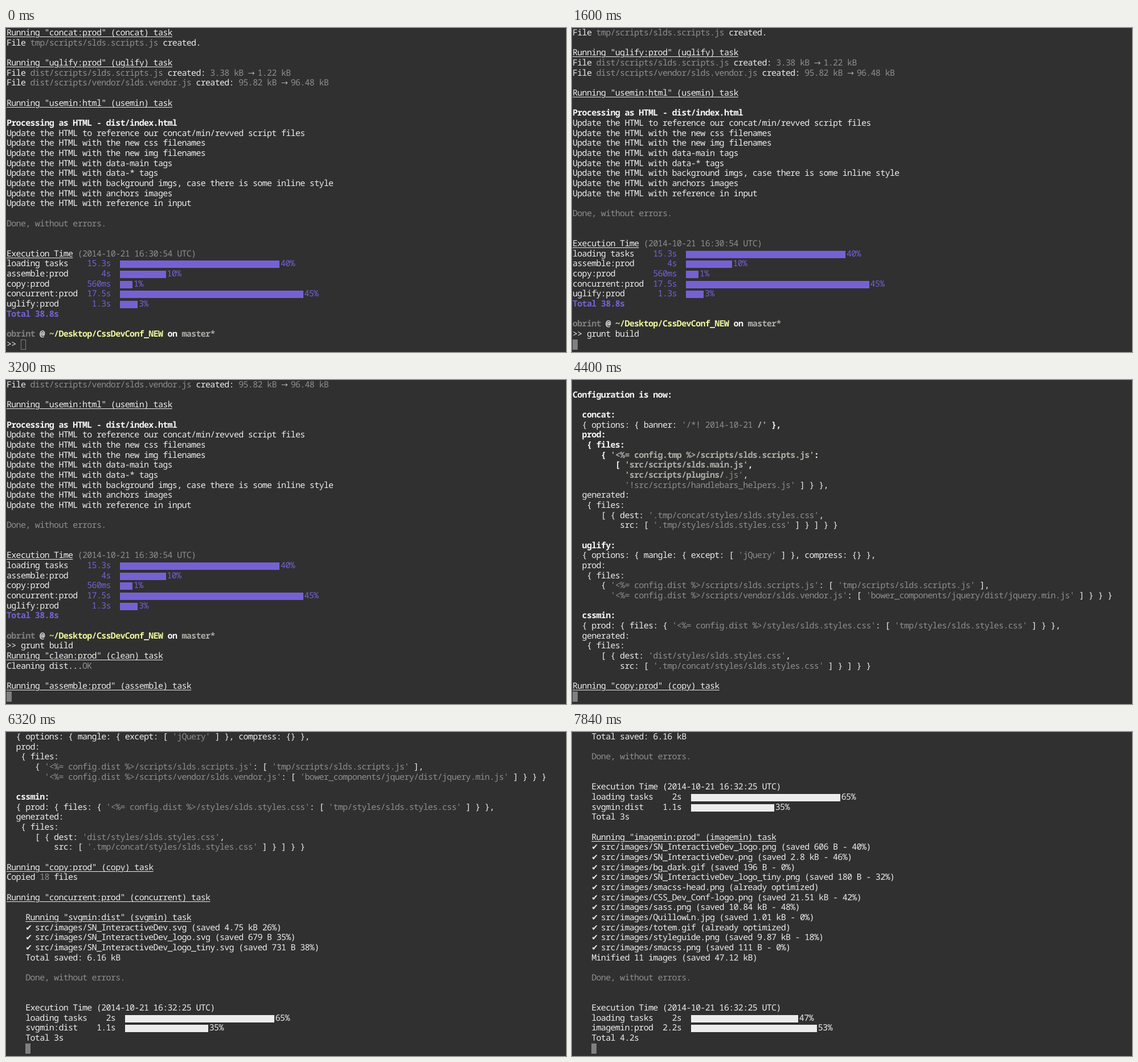
Animation of 983 by 570 pixels, one loop 8000 ms. Source, as an HTML page:

```html
<!DOCTYPE html>
<html lang="en">
<head>
<meta charset="utf-8">
<title>Terminal build</title>
<style>
  html, body { margin: 0; width: 100%; height: 100%; overflow: hidden; background: #303030; }
  #screen {
    position: absolute; left: 0; top: 0; width: 983px; height: 570px; overflow: hidden;
    color: #ececec; background: #303030;
    font: 300 15px/18px "Noto Sans Mono", "DejaVu Sans Mono", monospace;
    letter-spacing: -0.69px; text-rendering: geometricPrecision;
    font-variant-ligatures: none;
  }
  .row { position: absolute; left: 1px; height: 18px; white-space: pre; }
  .g { color: #8e8e8e; }
  .b, .G, .n, .y, .P { font-weight: 700; }
  .b { color: #f6f6f6; }
  .G { color: #adada6; }
  .n { color: #7d7f7d; }
  .y { color: #eef79a; }
  .p, .P { color: #7661d3; }
  .u { text-decoration: underline; text-decoration-thickness: 1px; text-underline-offset: 2px; }
  .bar { display: inline-block; height: 13px; margin-right: 1.5px; vertical-align: -3px; background: currentColor; }
  .sym {
    display: inline-block; width: 8.31px; line-height: 0; letter-spacing: 0;
    font-family: "DejaVu Sans", sans-serif; font-size: 14px;
  }
  #cursor { position: absolute; top: 548px; width: 9px; height: 18px; box-sizing: border-box; background: #808080; }
  #cursor.hollow { background: none; border: 1px solid #808080; }
</style>
</head>
<body>
<div id="screen"><div id="cursor"></div></div>
<script>
const LOOP = 8000, ROWS = 32, CELL = 8.31, PITCH = 17.67;
const COMMAND = 'grunt build';

// "|x" switches to style x; "[[n]]" is a bar n pixels wide.
const run = (task, pad = '') => `${pad}|uRunning "${task}" (${task.split(':')[0]}) task`;
const file = (name, from, to) => `File |g${name}|w created: |g${from}|w → |g${to}`;
const update = what => `Update the HTML ${what}`;
const conf = s => s.replace(/'[^']*'/g, '|g$&|w');
const confBold = s => '|b' + s.replace(/'[^']*'/g, '|G$&|b');
const stat = (name, time, width, pct) =>
  `${name}|p${time.padStart(22 - name.length)}  [[${width}]]${pct}%`;
const subStat = (name, time, width, pct) =>
  `    ${name}${time.padStart(19 - name.length)}  [[${width}]]${pct}%`;
const image = (name, note) => `    ✔ src/images/${name} (${note})`;
const done = pad => `${pad}|gDone, without errors.`;
const subTime = '    Execution Time (2014-10-21 16:32:25 UTC)';

const lines = [
  run('concat:prod'),
  'File |gtmp/scripts/slds.scripts.js|w created.',
  '',
  run('uglify:prod'),
  file('dist/scripts/slds.scripts.js', '3.38 kB', '1.22 kB'),
  file('dist/scripts/vendor/slds.vendor.js', '95.82 kB', '96.48 kB'),
  '',
  run('usemin:html'),
  '',
  '|bProcessing as HTML - dist/index.html',
  update('to reference our concat/min/revved script files'),
  update('with the new css filenames'),
  update('with the new img filenames'),
  update('with data-main tags'),
  update('with data-* tags'),
  update('with background imgs, case there is some inline style'),
  update('with anchors images'),
  update('with reference in input'),
  '',
  done(''),
  '', '',
  '|uExecution Time|g (2014-10-21 16:30:54 UTC)',
  stat('loading tasks', '15.3s', 280, 40),
  stat('assemble:prod', '4s', 80.5, 10),
  stat('copy:prod', '560ms', 22, 1),
  stat('concurrent:prod', '17.5s', 321.5, 45),
  stat('uglify:prod', '1.3s', 31, 3),
  '|PTotal 38.8s',
  '',
  '|nobrint|b @ |y~/Desktop/CssDevConf_NEW|b on |Gmaster*',
  '>> ' + COMMAND,
  run('clean:prod'),
  'Cleaning dist...|gOK',
  '',
  run('assemble:prod'),
  '',
  '|bConfiguration is now:',
  '',
  '|b  concat:',
  "  { options: { banner: |g'/*! 2014-10-21 |G/'|b },",
  '|b  prod:',
  '|b   { files:',
  confBold("      { '<%= config.tmp %>/scripts/slds.scripts.js':"),
  confBold("         [ 'src/scripts/slds.main.js',"),
  "           |G'src/scripts/plugins/|g.js'|w,",
  conf("           '!src/scripts/handlebars_helpers.js' ] } },"),
  '  generated:',
  '   { files:',
  conf("      [ { dest: '.tmp/concat/styles/slds.styles.css',"),
  conf("          src: [ '.tmp/styles/slds.styles.css' ] } ] } }"),
  '',
  '|b  uglify:',
  conf("  { options: { mangle: { except: [ 'jQuery' ] }, compress: {} },"),
  '  prod:',
  '   { files:',
  conf("      { '<%= config.dist %>/scripts/slds.scripts.js': [ 'tmp/scripts/slds.scripts.js' ],"),
  conf("        '<%= config.dist %>/scripts/vendor/slds.vendor.js': [ 'bower_components/jquery/dist/jquery.min.js' ] } } }"),
  '',
  '|b  cssmin:',
  conf("  { prod: { files: { '<%= config.dist %>/styles/slds.styles.css': [ 'tmp/styles/slds.styles.css' ] } },"),
  '  generated:',
  '   { files:',
  conf("      [ { dest: 'dist/styles/slds.styles.css',"),
  conf("          src: [ '.tmp/concat/styles/slds.styles.css' ] } ] } }"),
  '',
  run('copy:prod'),
  'Copied |g18|w files',
  '',
  run('concurrent:prod'),
  '',
  run('svgmin:dist', '    '),
  image('SN_InteractiveDev.svg', 'saved 4.75 kB 26%'),
  image('SN_InteractiveDev_logo.svg', 'saved 679 B 35%'),
  image('SN_InteractiveDev_logo_tiny.svg', 'saved 731 B 38%'),
  '    Total saved: 6.16 kB',
  '',
  done('    '),
  '', '',
  subTime,
  subStat('loading tasks', '2s', 262.5, 65),
  subStat('svgmin:dist', '1.1s', 146.5, 35),
  '    Total 3s',
  '',
  run('imagemin:prod', '    '),
  image('SN_InteractiveDev_logo.png', 'saved 606 B - 40%'),
  image('SN_InteractiveDev.png', 'saved 2.8 kB - 46%'),
  image('bg_dark.gif', 'saved 196 B - 0%'),
  image('SN_InteractiveDev_logo_tiny.png', 'saved 180 B - 32%'),
  image('smacss-head.png', 'already optimized'),
  image('CSS_Dev_Conf-logo.png', 'saved 21.51 kB - 42%'),
  image('sass.png', 'saved 10.84 kB - 48%'),
  image('QuillowLn.jpg', 'saved 1.01 kB - 0%'),
  image('totem.gif', 'already optimized'),
  image('styleguide.png', 'saved 9.87 kB - 18%'),
  image('smacss.png', 'saved 111 B - 0%'),
  '    Minified 11 images (saved 47.12 kB)',
  '',
  done('    '),
  '', '',
  subTime,
  subStat('loading tasks', '2s', 188.5, 47),
  subStat('imagemin:prod', '2.2s', 221.5, 53),
  '    Total 4.2s'
];

// [time, first visible line]
const scrolls = [
  [0, 0], [1440, 1], [2160, 2], [2320, 3], [2640, 5],
  [4400, 36], [4560, 39], [6320, 53], [6720, 75]
];
const keyTime = i => i < 2 ? 240 + 80 * i : 640 + 80 * (i - 2);

const toHtml = line => ('|w' + line).split('|').slice(1).map(part => {
  const text = part.slice(1)
    .replace(/&/g, '&amp;').replace(/</g, '&lt;')
    .replace(/[✔→]/g, '<span class="sym">$&</span>')
    .replace(/\[\[([\d.]+)\]\]/, '<span class="bar" style="width:$1px"></span>');
  return `<span class="${part[0]}">${text}</span>`;
}).join('');

const screenEl = document.getElementById('screen');
const cursor = document.getElementById('cursor');
const html = lines.map(toHtml);
const rows = Array.from({ length: ROWS }, (_, r) => {
  const row = document.createElement('div');
  row.className = 'row';
  row.style.top = Math.round(r * PITCH) - 1 + 'px';
  return screenEl.insertBefore(row, cursor);
});

let shown = '';
function draw(t) {
  const [since, top] = scrolls.filter(s => s[0] <= t).pop();
  const typed = [...COMMAND].filter((_, i) => keyTime(i) <= t).join('');
  const state = top + typed;
  if (state !== shown) {
    shown = state;
    rows.forEach((row, r) => {
      row.innerHTML = r < ROWS - 1 ? html[top + r] : top ? '' : toHtml('>> ' + typed);
    });
  }

  // The cursor blinks, but output keeps it lit for a moment.
  const lit = t < 1440 || t - since < 160 || Math.floor((t - 160) / 240) % 2 === 0;
  const col = top === 0 ? 3 + typed.length : t < 6320 ? 0 : 4;
  cursor.style.left = Math.round(1 + col * CELL) + 'px';
  cursor.style.visibility = lit ? 'visible' : 'hidden';
  cursor.className = t < 160 ? 'hollow' : '';
}

const start = performance.now();
function tick() {
  draw((performance.now() - start) % LOOP);
  requestAnimationFrame(tick);
}
tick();
</script>
</body>
</html>
```
